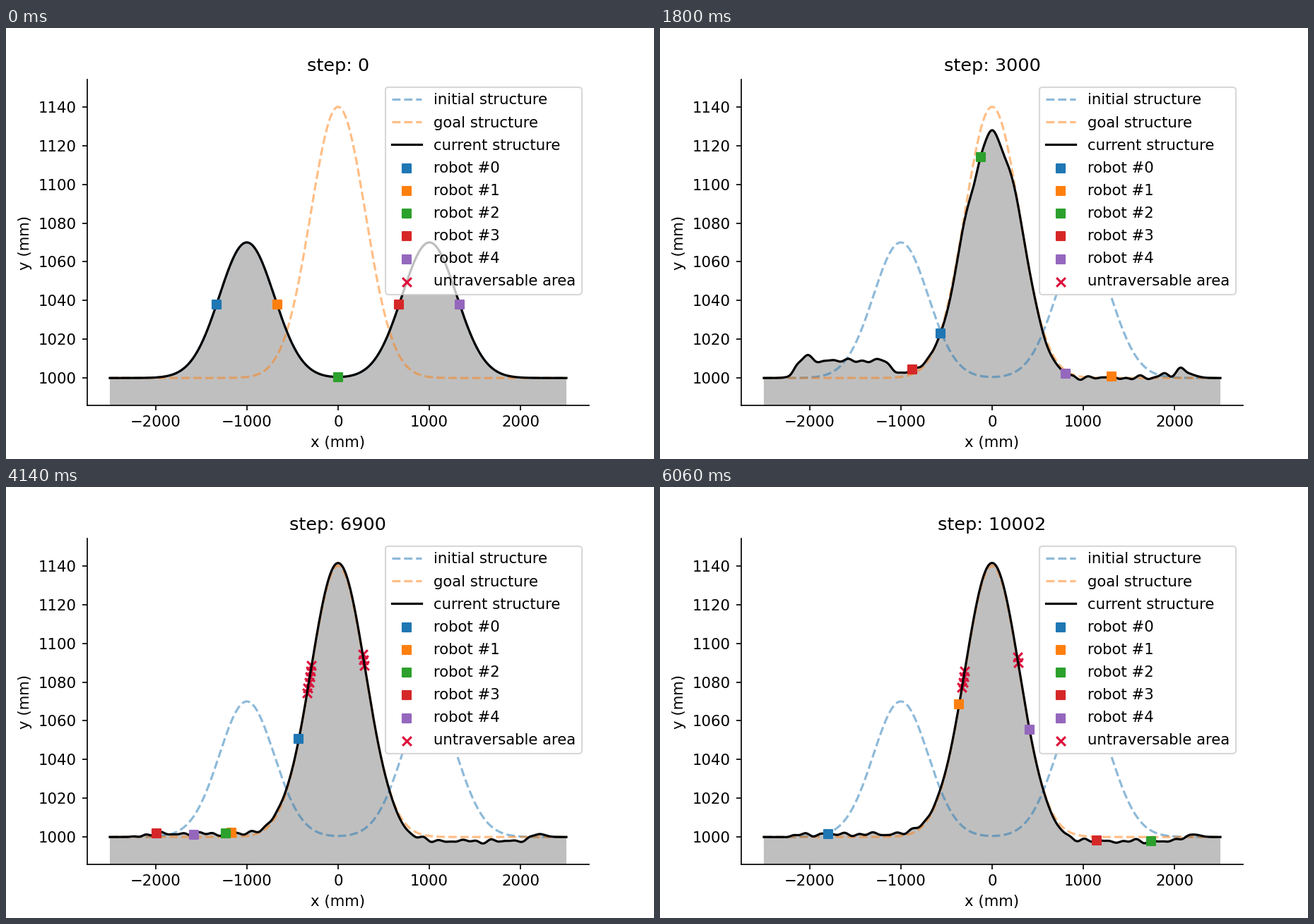
A matplotlib script for the animation above (6.12 s loop, 917 by 611 pixels).

```python
import numpy as np
import matplotlib.pyplot as plt
from matplotlib.animation import FuncAnimation
from matplotlib.patches import Rectangle

W, H, DPI = 917, 611, 152.8
FRAMES, INTERVAL = 102, 60
LAST_STEP = 10002
BASE, FLOOR, TOP = 1000, 986, 1154
HALF = 2200  # step at which both hills are taken down
REACH = 2050  # robots turn around here

# key steps, robot positions and number of steep spots per flank
STEPS = [0, HALF, 3800, 5400, 6900, 8200, LAST_STEP]
STOPS = [
    [-1333, -1667, 534, 1735, -430, 725, -1796],
    [-667, -1027, -1594, 581, -1168, -1808, -360],
    [0, 727, -980, -1316, -1230, 1842, 1741],
    [667, -147, 1900, 321, -1987, 375, 1149],
    [1333, 248, 1362, -1184, -1579, -500, 410],
]
STEEP_LEFT = [0, 0, 0, 3, 6, 0, 4]
STEEP_RIGHT = [0, 0, 0, 7, 3, 0, 2]

x = np.linspace(-2500, 2500, 1001)
rng = np.random.default_rng(4)
WAVES = [(2 * np.pi / length, rng.uniform(0, 2 * np.pi)) for length in (145, 190, 260, 410)]


def hill(center, height, sigma=300):
    return height * np.exp(-((x - center) ** 2) / (2 * sigma ** 2))


def plateau(left, right, soft=80):
    return (np.tanh((x - left) / soft) - np.tanh((x - right) / soft)) / 2


initial = hill(-1000, 70) + hill(1000, 70)
goal = hill(0, 140)

# material pushed outwards, and the part of the goal not yet filled
spread = (16.5 * plateau(-2170, -1090, 65) + hill(-2035, 4.5, 50) + hill(-910, 3.7, 45)
          + 3.5 * plateau(950, 2170) + hill(1888, 5, 45) + hill(2066, 8, 50))
missing = (52 * np.exp(-((x + 30) / 240) ** 4) - hill(0, 7, 40) + hill(124, 3, 35)
           + hill(-205, 5, 35) + hill(-460, 9, 90) + hill(590, 6, 60))
# what stays uneven at the end
rest = (1.4 * plateau(-2150, -520) - 2.2 * plateau(640, 2080)
        + hill(0, 1.5, 250) + hill(2200, 1.5, 70))
rough = plateau(-2200, -650) + plateau(800, 2150)


def built(step):
    """Ground height above the base from HALF on."""
    age = step - HALF
    fill = np.exp(-age / 650)
    ripple = sum(np.sin(k * x + phase + age / 900) for k, phase in WAVES)
    return (goal - fill * missing + np.exp(-age / 1100) * spread
            + (1 - fill) * rest + .35 * rough * ripple)


def terrain(step):
    if step >= HALF:
        return BASE + built(step)
    s = step / HALF
    return BASE + (1 - s) * initial + s * built(HALF)


def bounce(u):
    return REACH - abs((u + REACH) % (4 * REACH) - 2 * REACH)


def robot_x(n, step):
    k = min(np.searchsorted(STEPS, step, side="right") - 1, len(STEPS) - 2)
    s = (step - STEPS[k]) / (STEPS[k + 1] - STEPS[k])
    a, b = STOPS[n][k:k + 2]
    laps = (1 + (n + k) % 2) * (-1) ** n
    return bounce(a + (b - a + 4 * REACH * laps) * s)


def steep_spots(center, counts, step):
    n = round(np.interp(step, STEPS, counts))
    return center + 10 * (np.arange(n) - (n - 1) / 2)


fig, ax = plt.subplots(figsize=((W + .01) / DPI, (H + .01) / DPI), dpi=DPI)
fig.subplots_adjust(left=.125, right=.9, bottom=.125, top=.88)
ax.spines[["top", "right"]].set_visible(False)

ax.plot(x, BASE + initial, "--", color="tab:blue", alpha=.5, label="initial structure")
ax.plot(x, BASE + goal, "--", color="tab:orange", alpha=.5, label="goal structure")
line, = ax.plot(x, BASE + initial, color="black", zorder=3, label="current structure")
ground, = ax.fill(x, BASE + initial, color="gray", alpha=.5, lw=0, zorder=1)
robots = [ax.scatter([0], [BASE], marker="s", color=f"C{n}", zorder=4, label=f"robot #{n}")
          for n in range(len(STOPS))]
crosses = ax.scatter([], [], marker="x", color="crimson", zorder=2.5,
                     label="untraversable area")

ax.set_xlim(-2750, 2750)
ax.set_ylim(FLOOR, TOP)
ax.set_xlabel("x (mm)")
ax.set_ylabel("y (mm)")
title = ax.set_title("step: 0")

# the legend hides everything but the black line
legend = ax.legend(loc="upper right", framealpha=.75, labelspacing=.57)
fig.canvas.draw()
box = legend.get_frame().get_window_extent().transformed(ax.transAxes.inverted())
ax.add_patch(Rectangle((box.x0, box.y0), box.width, box.height, color="white", lw=0,
                       transform=ax.transAxes, zorder=2.4))


def update(i):
    step = LAST_STEP if i == FRAMES - 1 else 100 * i
    y = terrain(step)
    line.set_ydata(y)
    ground.set_xy(np.column_stack([np.r_[x, x[-1], x[0]], np.r_[y, FLOOR, FLOOR]]))
    for n, robot in enumerate(robots):
        rx = robot_x(n, step)
        robot.set_offsets([[rx, np.interp(rx, x, y)]])
    sx = np.r_[steep_spots(-315, STEEP_LEFT, step), steep_spots(280, STEEP_RIGHT, step)]
    crosses.set_offsets(np.column_stack([sx, np.interp(sx, x, y)]))
    title.set_text(f"step: {step}")
    return [line, ground, *robots, crosses, title]


anim = FuncAnimation(fig, update, frames=FRAMES, interval=INTERVAL,
                     repeat=True, repeat_delay=0, blit=False)
plt.show()
```
